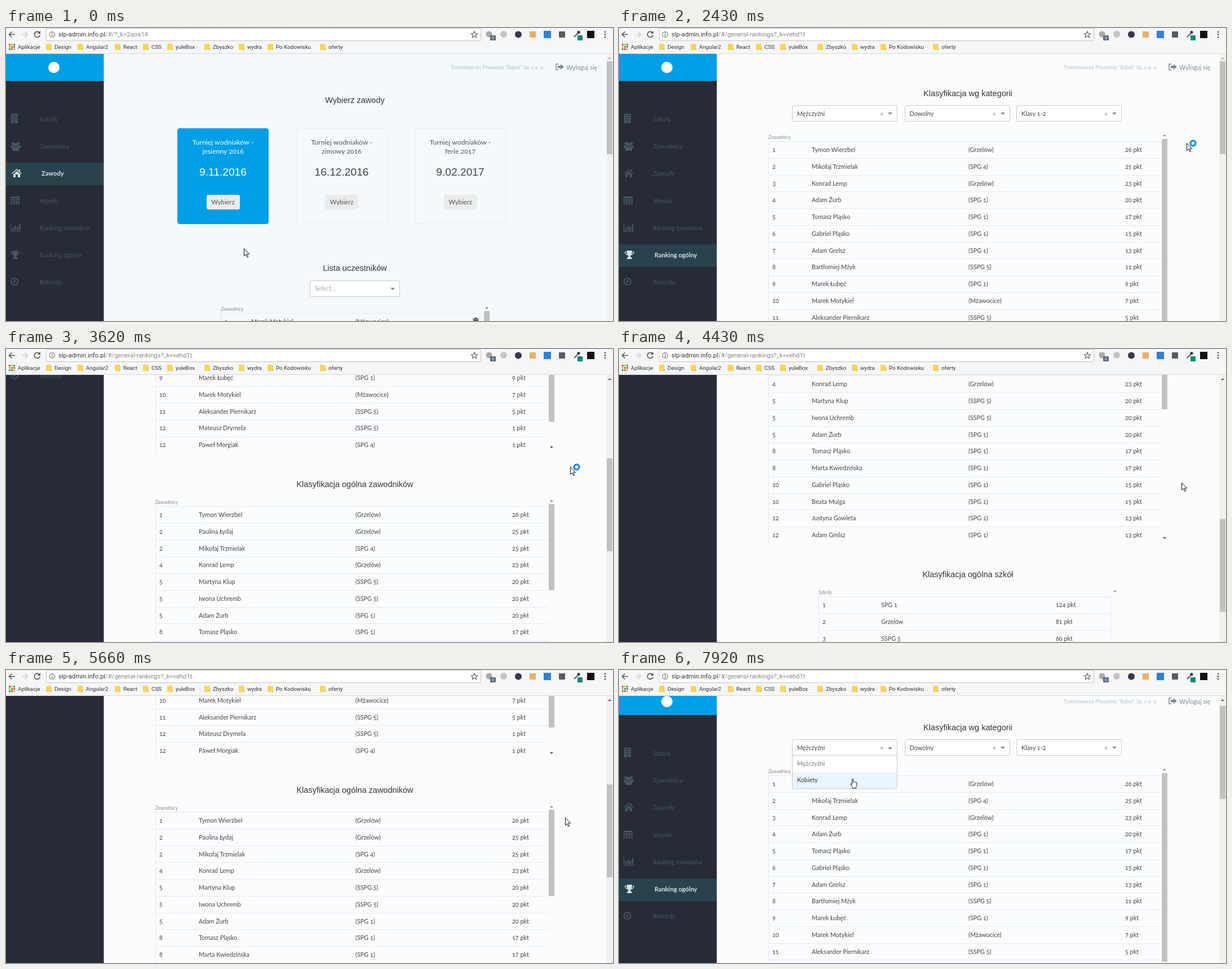
Write an HTML page that moves like this. It is 1077x520 px and loops after 8000 ms.

```html
<!DOCTYPE html>
<html lang="pl">
<head>
<meta charset="utf-8">
<title>Ranking ogólny</title>
<style>
html, body { margin: 0; width: 100%; height: 100%; overflow: hidden; background: #fbfcfe; }
#stage { position: relative; width: 1077px; height: 520px; overflow: hidden; font-family: Lato, sans-serif; }
#stage div, #stage svg { position: absolute; box-sizing: border-box; }
#stage svg { overflow: visible; }
.text { white-space: pre; line-height: 20px; height: 20px; font-variant-numeric: oldstyle-nums; }
.mid { transform: translateX(-50%); }
.head { font-family: "Liberation Sans", Arial, sans-serif; }
.ui { font-family: Roboto, sans-serif; font-variant-numeric: normal; }
.box { background: #fff; border: 1px solid #c6c9cb; border-radius: 3px; }
.list { overflow: hidden; border: solid #e3e9ec; border-width: 1px 0 0 1px; }
.row { border-bottom: 1px solid #e6ebee; left: 0; width: 100%; height: 29.75px; }
.nav { left: 0; width: 174px; height: 40px; color: #47565f; }
.nav.hover { color: #93a4ac; }
.nav.on { background: #29434e; color: #d9e1e4; font-weight: bold; }
.nav.on .text { left: 63px !important; }
.nav.on svg { left: 10px !important; }
</style>
</head>
<body>
<div id="stage"></div>
<script>
const stage = document.getElementById('stage');

function div(parent, x, y, w, h, css = '', cls = '') {
  const el = document.createElement('div');
  el.className = cls;
  el.style.cssText = `left:${x}px;top:${y}px;width:${w}px;height:${h}px;${css}`;
  parent.append(el);
  return el;
}
// y is the middle of the line
function text(parent, x, y, str, size = 10.8, color = '#444', cls = '', css = '') {
  const el = document.createElement('div');
  el.className = 'text ' + cls;
  el.style.cssText = `left:${x}px;top:${y - 10}px;font-size:${size}px;color:${color};${css}`;
  el.textContent = str;
  parent.append(el);
  return el;
}
function svg(parent, x, y, w, h, body) {
  const holder = document.createElement('div');
  holder.innerHTML = `<svg width="${w}" height="${h}" viewBox="0 0 ${w} ${h}" style="left:${x}px;top:${y}px">${body}</svg>`;
  return parent.appendChild(holder.firstChild);
}
const triangle = (parent, x, y, up, color = '#888', r = 4) =>
  svg(parent, x - r, y - r / 2, 2 * r, r,
    `<path fill="${color}" d="${up ? `M0 ${r}L${r} 0l${r} ${r}z` : `M0 0h${2 * r}l-${r} ${r}z`}"/>`);

// Scrolling page; its contents use stage coordinates
const view = div(stage, 0, 46, 1077, 474, 'overflow:hidden');
div(view, 0, 0, 174, 474, 'background:#272b36');
const doc = div(view, 0, 0, 1077, 1500);
const homePage = div(doc, 0, -46, 1077, 1500);
const rankPage = div(doc, 0, -46, 1077, 1500);
const frame = div(doc, 0, -46, 1077, 600);
div(homePage, 174, 0, 891, 1500, 'background:#f4f9fc');
div(rankPage, 174, 0, 891, 1500, 'background:#fbfcfe');

div(frame, 0, 45, 174, 49, 'background:#009fe6');
svg(frame, 75, 60, 20, 20, '<circle cx="10" cy="10" r="10" fill="#fff"/>');
text(frame, 789, 70, 'Trzemlowicka Pływalnia "Bąbel" Sp. z o. o.', 9.1, '#aebfc3');
text(frame, 994, 70, 'Wyloguj się', 10.8, '#7d8a8c');
svg(frame, 975, 63, 15, 12, `<path d="M5 1H1v10h4" fill="none" stroke="#7d8a8c" stroke-width="1.5"/>
  <path d="M4 4h5V1l6 5-6 5V8H4z" fill="#7d8a8c"/>`);

const icons = {
  'Szkoły': `<path fill-rule="evenodd" d="M1 0h12v17H1zM3 2v2h2V2zm3 0v2h2V2zm3 0v2h2V2zM3 6v2h2V6zm3 0v2h2V6zm3 0v2h2V6zM3 10v2h2v-2zm3 0v2h2v-2zm3 0v2h2v-2zM6 14v3h2v-3z"/>`,
  'Zawodnicy': `<circle cx="4" cy="4" r="2.5"/><circle cx="14" cy="4" r="2.5"/><circle cx="9" cy="6" r="3.5"/>
    <path d="M0 12V9q0-2 5-2l1 3-3 2zM18 12V9q0-2-5-2l-1 3 3 2zM3 17v-4q1-3 6-3t6 3v4z"/>`,
  'Zawody': `<path d="M9 1l9 8-1 1-8-7-8 7-1-1zM13 2h2v4l-2-2zM9 5l6 5v6h-4v-5H7v5H3v-5z"/>`,
  'Wyniki': `<path fill-rule="evenodd" d="M0 2h16v14H0zM1.5 5v2.5h3.5V5zm5 0v2.5H10V5zm5 0v2.5h3V5zM1.5 9v2.5H5V9zm5 0v2.5H10V9zm5 0v2.5h3V9zM1.5 12.7V15H5v-2.3zm5 0V15H10v-2.3zm5 0V15h3v-2.3z"/>`,
  'Ranking zawodów': `<path d="M0 1h1.3v14H19v1.3H0zM3 9h2.5v5H3zM7 6h2.5v8H7zM11 8h2.5v6H11zM15 3h2.5v11H15z"/>`,
  'Ranking ogólny': `<path fill-rule="evenodd" d="M4 1h9v2h4q0 5-5 6-2 2-2 3 3 1 3 4H4q0-3 3-4 0-1-2-3-5-1-5-6h4zM1.5 4q0 2.5 3 3.5L4 4zm14 0H13l-.5 3.500q3-1 3-3.500z"/>`,
  'Rekordy': `<g fill="none" stroke="currentColor" stroke-width="2"><circle cx="7" cy="8" r="6"/><path d="M7.5 4.5v4h-3"/></g>`
};
const navs = Object.entries(icons).map(([label, shape], i) => {
  const item = div(frame, 0, 142.25 + 48.25 * i, 174, 40, '', 'nav');
  svg(item, 8, 10, 18, 18, `<g fill="currentColor">${shape}</g>`);
  text(item, 60, 19.5, label, 11.1, 'inherit');
  return item;
});
// Soft edge of the side bar
div(view, 173, 0, 1, 474, 'background:#fbfcfe80');

function list(parent, x, y, w, h, title, columns, rows) {
  text(parent, x, y - 7.5, title, 9, '#8b8f90', '', 'font-style:italic');
  const body = div(parent, x, y, w, h, '', 'list');
  rows.forEach((cells, r) => {
    const row = div(body, 0, 29.75 * r, w, 29.75, '', 'row');
    cells.forEach((cell, c) => text(row, columns[c] - x - 1, 14, cell));
  });
  return body;
}
function select(parent, x, y, w, value, clear = true) {
  const box = div(parent, x, y, w, 29, '', 'box');
  text(box, 8, 13.5, value, 10.8, clear ? '#444' : '#aaa');
  if (clear) text(box, w - 32, 13.5, '×', 12, '#888');
  return triangle(box, w - 14, 14, false, '#888');
}

// Competition page
text(homePage, 619, 128, 'Wybierz zawody', 14.5, '#333', 'head mid');
[['jesienny 2016', '9.11.2016'], ['zimowy 2016', '16.12.2016'], ['ferie 2017', '9.02.2017']].forEach(([term, date], i) => {
  const on = i === 0, ink = on ? '#fff' : '#555';
  const card = div(homePage, 304 + 210.5 * i, 178, 162, 170,
    `border-radius:4px;border:1px solid ${on ? '#009fe6' : '#e6edf1'};${on ? 'background:#009fe6' : ''}`);
  text(card, 80, 24, 'Turniej wodniaków -', 12.3, ink, 'mid');
  text(card, 80, 40, term, 12.3, ink, 'mid');
  text(card, 80, 77, date, 19.2, on ? '#fff' : '#444', 'head mid');
  div(card, 50.5, 117, 59, 26, 'background:#ebebeb;border-radius:3px');
  text(card, 80, 129.5, 'Wybierz', 11.3, '#555', 'mid');
});
text(homePage, 619, 426, 'Lista uczestników', 14.5, '#333', 'head mid');
select(homePage, 539, 447.5, 160, 'Select...', false);
list(homePage, 381, 506, 462, 200, 'Zawodnicy', [388, 435, 620], [['1', 'Marek Motykiel', '(Mżawocice)']]);
svg(homePage, 828, 514, 11, 12, '<path fill="#555" d="M0 2h3V0h5v2h3v1.5H0zM1 4h9v8H1z"/>');
triangle(homePage, 853, 496, true, '#777', 3);
div(homePage, 848, 502, 10, 60, 'background:#c1c1c1');

// Ranking page
const swimmers = {
  tymon: ['Tymon Wierzbel', '(Grzelów)', 26], paulina: ['Paulina Łydaj', '(Grzelów)', 25],
  miko: ['Mikołaj Trzmielak', '(SPG 4)', 25], konrad: ['Konrad Lemp', '(Grzelów)', 23],
  martyna: ['Martyna Klup', '(SSPG 5)', 20], iwona: ['Iwona Uchremb', '(SSPG 5)', 20],
  zurb: ['Adam Żurb', '(SPG 1)', 20], tomasz: ['Tomasz Pląsko', '(SPG 1)', 17],
  marta: ['Marta Kwiedzińska', '(SPG 1)', 17], gabriel: ['Gabriel Pląsko', '(SPG 1)', 15],
  beata: ['Beata Mulga', '(SPG 1)', 15], justyna: ['Justyna Gowleta', '(SPG 1)', 13],
  grelsz: ['Adam Grelsz', '(SPG 1)', 13], mzyk: ['Bartłomiej Mżyk', '(SSPG 5)', 11],
  lubec: ['Marek Łubęć', '(SPG 1)', 9], marek: ['Marek Motykiel', '(Mżawocice)', 7],
  olek: ['Aleksander Piernikarz', '(SSPG 5)', 5], mateusz: ['Mateusz Drymela', '(SSPG 5)', 1],
  pawel: ['Paweł Morgiak', '(SPG 4)', 1]
};
// Equal scores share the rank
function ranked(keys) {
  const people = keys.split(' ').map(k => swimmers[k]);
  return people.map(([name, school, points]) =>
    [String(people.findIndex(p => p[2] === points) + 1), name, school, points + ' pkt']);
}
const columns = [272, 342, 620, 898];

text(rankPage, 619, 116, 'Klasyfikacja wg kategorii', 14.5, '#333', 'head mid');
list(rankPage, 264.5, 201, 697, 384, 'Zawodnicy', columns,
  ranked('tymon miko konrad zurb tomasz gabriel grelsz mzyk lubec marek olek mateusz pawel'));
triangle(rankPage, 968, 190, true, '#888', 3);
div(rankPage, 963, 197, 10, 335, 'background:#c1c1c1');
triangle(rankPage, 968, 577.5, false, '#444', 3);

text(rankPage, 619, 642.5, 'Klasyfikacja ogólna zawodników', 14.5, '#333', 'head mid');
list(rankPage, 264.5, 682, 697, 385, 'Zawodnicy', columns,
  ranked('tymon paulina miko konrad martyna iwona zurb tomasz marta gabriel beata justyna grelsz'));
triangle(rankPage, 968, 672, true, '#888', 3);
div(rankPage, 963, 678, 10, 153, 'background:#c1c1c1');
triangle(rankPage, 968, 1059, false, '#444', 3);

text(rankPage, 619, 1124, 'Klasyfikacja ogólna szkół', 14.5, '#333', 'head mid');
list(rankPage, 354, 1163, 519, 210, 'Szkoły', [361, 465, 775],
  [['SPG 1', 124], ['Grzelów', 81], ['SSPG 5', 60], ['SPG 4', 26], ['Mżawocice', 18], ['ZSG 4', 9], ['Wiązulka', 0]]
    .map(([school, points], i) => [String(i + 1), school, points + ' pkt']))
  .style.borderRight = '1px solid #e3e9ec';
triangle(rankPage, 880, 1153, true, '#999', 3);
triangle(rankPage, 880, 1379, false, '#999', 3);

const menuArrow = select(rankPage, 307, 137, 187, 'Mężczyźni');
select(rankPage, 506.5, 137, 187, 'Dowolny');
select(rankPage, 705, 137, 187, 'Klasy 1-2');
const menu = div(rankPage, 307, 165, 187, 60, 'overflow:hidden;border-radius:0 0 3px 3px', 'box');
const options = ['Mężczyźni', 'Kobiety'].map((label, i) => {
  const option = div(menu, 0, 29 * i, 186, 29);
  text(option, 8, 14, label, 10.8, 'inherit');
  return option;
});

// Page scroll bar
div(view, 1065, 0, 12, 474, 'background:#f1f1f1');
const upArrow = triangle(view, 1071, 7, true, '#505050', 3);
const thumb = div(view, 1066, 13, 10, 165, 'background:#c1c1c1');

// Browser bars
const bar = div(stage, 0, 0, 1077, 46, 'background:#f5f6f7;border-bottom:1px solid #d5d8da', 'ui');
div(bar, 71, 0, 772, 23, 'background:#fff;border:1px solid #bfc2c4;border-radius:2px');
svg(bar, 0, 0, 1077, 24, `
  <g fill="none" stroke="#555" stroke-width="1.6">
    <path d="M16 11.500H6M10.500 6.500l-5 5 5 5"/>
    <path stroke="#ccc" d="M28 11.500h10M33.500 6.500l5 5-5 5"/>
    <path d="M59.500 8.500a5 5 0 1 0 .8 4"/><path fill="#555" stroke="none" d="M61 5v5h-5z"/>
    <circle cx="82" cy="11.500" r="4.800" stroke-width="1"/><path stroke-width="1.200" d="M82 8v1.500M82 10.500v4"/>
    <path stroke-width="1.100" d="M831 6l1.600 3.700 4 .3-3 2.600 1 4-3.600-2.200-3.600 2.200 1-4-3-2.600 4-.3z"/>
    <path d="M1008 16l7-7" stroke-width="2"/>
  </g>
  <circle cx="857" cy="11" r="5.500" fill="#aaa"/><rect x="859" y="13" width="10" height="9" rx="1" fill="#5b6a7d"/>
  <circle cx="883" cy="11" r="6" fill="#c5c5c5"/><circle cx="909" cy="11.500" r="6" fill="#3a3550"/>
  <rect x="929" y="6" width="11" height="11" fill="#e8b063"/><rect x="954" y="5" width="13" height="13" rx="1" fill="#2f80dc"/>
  <rect x="981" y="6" width="11" height="11" rx="1" fill="#555c63"/><circle cx="1016" cy="7.500" r="2.500" fill="#333"/>
  <rect x="1014" y="13" width="9" height="9" fill="#0b8a77"/><rect x="1031" y="5" width="13" height="13" fill="#111"/>
  <g fill="#555"><circle cx="1063" cy="7" r="1.400"/><circle cx="1063" cy="11.500" r="1.400"/><circle cx="1063" cy="16" r="1.400"/></g>`);
text(bar, 862, 17.5, '0', 7, '#fff', 'ui');
const host = text(bar, 93, 11.5, 'slp-admin.info.pl', 11.2, '#333', 'ui');
const path = document.createElement('span');
path.style.color = '#858585';
host.append(path);

const dots = ['#e2473b', '#f0b429', '#34a265'];
for (let i = 0; i < 9; i++)
  div(bar, 5 + 4 * (i % 3), 28 + 4 * (i / 3 | 0), 3, 3, `background:${dots[(i + (i / 3 | 0)) % 3]}`);
text(bar, 21, 34, 'Aplikacje', 9.8, '#333', 'ui');
[[86, 'Design'], [142, 'Angular2'], [208, 'React'], [258, 'CSS'], [301, 'yuleBox'], [367, 'Zbyszko'],
 [428, 'wydra'], [479, 'Po Kodowisku'], [572, 'oferty']].forEach(([x, label]) => {
  svg(bar, x - 15, 28, 10, 11, '<path fill="#fbd45c" d="M0 0h9v2h1v9H0z"/><path fill="#f0bd3e" d="M8 8h2v3H8z"/>');
  text(bar, x, 34, label, 9.8, '#333', 'ui');
});

// Pointer
const pointer = div(stage, 0, 0, 0, 0);
const arrow = svg(pointer, 0, 0, 11, 17,
  '<path fill="#fff" stroke="#111" d="M.5.5v13l3-2.800 2.200 5 2-.9-2.200-4.800h4z"/>');
const hand = svg(pointer, -4, 0, 13, 18,
  '<path fill="#fff" stroke="#111" d="M3.500 11V1.500q1-1.500 2.200 0V7q1-1.200 2 0 1-1 2 .3 1.200-.8 2.300.7v5l-1.500 2.500V18H4.500v-2L.7 10.500q.8-1.600 2.800.5z"/>');
const ring = svg(pointer, 5, -6, 13, 13,
  '<circle cx="6.500" cy="6.500" r="4.500" fill="#fff" stroke="#2b8fe6" stroke-width="3.500"/>');

const pointerKeys = [[150, 422, 391], [860, 110, 398], [1100, 110, 398], [1600, 232, 396], [1860, 238, 397],
  [2380, 1008, 204], [2650, 1001, 209], [4250, 1001, 209], [4420, 998, 237], [4700, 998, 237], [5040, 992, 262],
  [6620, 992, 262], [7240, 414, 131], [7560, 414, 131], [7920, 414, 192]];
const scrollKeys = [[2740, 0], [2980, 212], [3350, 398], [3600, 398], [3620, 403], [3750, 403], [3990, 610],
  [4230, 610], [4430, 723], [4650, 898], [5240, 898], [5660, 430], [5830, 430], [6220, 98], [6460, 98],
  [6480, 90], [6590, 90], [6800, 14]];

function at(keys, t, ease = u => u) {
  const next = keys.findIndex(k => k[0] > t);
  if (next < 0) return keys[keys.length - 1].slice(1);
  if (next === 0) return keys[0].slice(1);
  const a = keys[next - 1], b = keys[next];
  const u = ease((t - a[0]) / (b[0] - a[0]));
  return a.slice(1).map((v, i) => v + (b[i + 1] - v) * u);
}
const smooth = u => u * u * (3 - 2 * u);
const show = (el, on) => { el.style.visibility = on ? 'visible' : 'hidden'; };

function draw(t) {
  const [x, y] = at(pointerKeys, t, smooth).map(Math.round);
  const [scroll] = at(scrollKeys, t).map(Math.round);
  const ranks = t >= 1060, open = t >= 7350;
  const onNav = x < 174 && !ranks;
  const isHand = (x < 174 && t < 1200) || t >= 7150;

  homePage.style.display = ranks ? 'none' : 'block';
  rankPage.style.display = ranks ? 'block' : 'none';
  path.textContent = ranks ? '/#/general-rankings?_k=vehd1t' : '/#/?_k=2qoa14';
  navs.forEach((nav, i) => {
    nav.classList.toggle('on', i === (ranks ? 5 : 2));
    nav.classList.toggle('hover', i === 5 && onNav);
  });

  doc.style.transform = `translateY(${-scroll}px)`;
  thumb.style.transform = `translateY(${scroll * 0.335}px)`;
  upArrow.style.opacity = scroll > 0 ? 1 : 0.45;

  menu.style.display = open ? 'block' : 'none';
  menuArrow.style.transform = open ? 'scaleY(-1)' : '';
  const focus = y > 180 ? 1 : 0;
  options.forEach((option, i) => {
    option.style.background = i === focus ? '#ebf5ff' : '#fff';
    option.style.color = i === focus ? '#333' : '#777';
  });

  pointer.style.transform = `translate(${x}px,${y}px)`;
  show(hand, isHand);
  show(arrow, !isHand);
  show(ring, !isHand && t >= 1200 && t < 3780);
}

const start = performance.now();
function tick() {
  draw((performance.now() - start) % 8000);
  requestAnimationFrame(tick);
}
tick();
</script>
</body>
</html>
```
